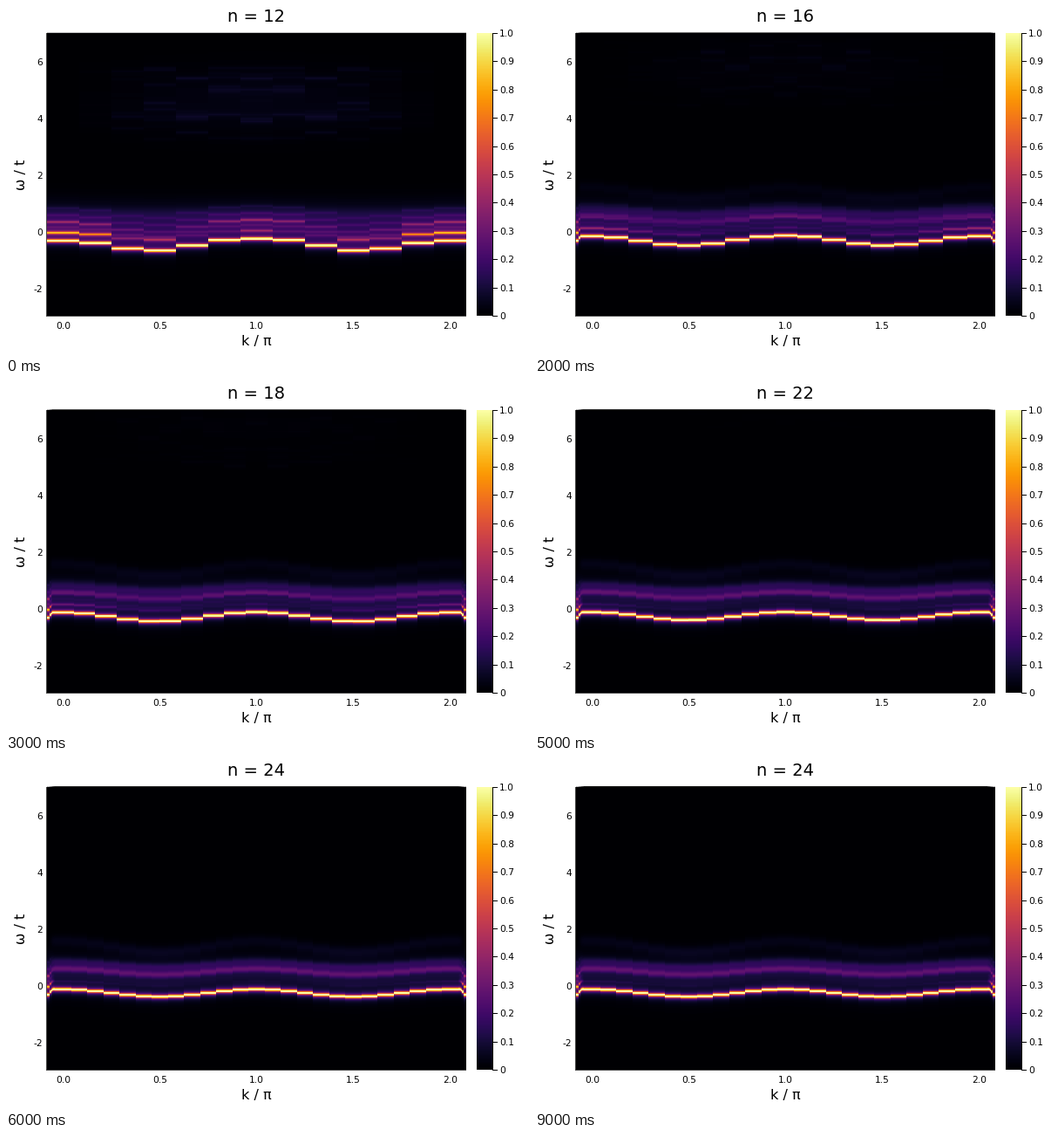
Recreate the animation shown at these times as a matplotlib script. Size 600 by 400 pixels, loop 10 s.

```python
import random

import numpy as np
import matplotlib.pyplot as plt
from matplotlib.animation import FuncAnimation

plt.rcParams["font.family"] = "DejaVu Sans"

W, H = 600, 400
LEFT, RIGHT, TOP, BOTTOM = 46, 528, 30, 356
UNIT_X, ZERO_X = 222.0, 65.5      # pixels per unit of k / pi, position of k = 0
UNIT_Y, ZERO_Y = 32.5, 259.0      # pixels per unit of omega / t, position of 0
FRAMES = 10
ETA = 0.045                       # line broadening
EDGE = 0.75                       # light left on the top row by each map
SPINE = 0.3
INFERNO = plt.get_cmap("inferno")

OMEGA = (ZERO_Y - np.arange(TOP + 1, BOTTOM - 1) - .5) / UNIT_Y
K = (np.arange(LEFT + 1, RIGHT) + .5 - ZERO_X) / UNIT_X


def sites(i):
    return min(24, 12 + 2 * i)


def sigmoid(x):
    return 1 / (1 + np.exp(-np.clip(x, -50, 50)))


def plateau(w, low, high, soft_low, soft_high):
    return sigmoid((w - low) / soft_low) * sigmoid((high - w) / soft_high)


def lorentz(w, center, height):
    return height * ETA**2 / ((w - center)**2 + ETA**2)


def gauss(w, center, width, height):
    return height * np.exp(-((w - center) / width)**2)


def lowest(k, step):
    """Lowest level: a cosine band whose finite-size shift dies out with n."""
    s = .55**step
    return (-.24 - .203 * s + (.192 - .01 * step) * np.cos(2 * np.pi * k)
            - s * (.06 * np.cos(np.pi * k) - .023 * np.cos(3 * np.pi * k)
                   + .02 * np.cos(4 * np.pi * k)))


def ladder(k, c, low):
    """Discrete levels above the lowest one, as (omega, height)."""
    first = np.interp(k, [0, .17, .33, .5, .67, .83, 1],
                      [.75, .62, .22, .34, .1, .1, .28])
    return [(low + .33 - .05 * c, first), (low + .66, .2 + .1 * c),
            (low + .48, .1), (low + .9, .08), (low + 1.15, .05)]


def spectrum(n, j, w):
    j = min(j, n - j)
    k = 2 * j / n
    step = (n - 12) / 2
    fade = .65**step
    c = np.cos(2 * np.pi * k)
    low = lowest(k, step)

    a = lorentz(w, low, 1.35)
    gap = .38 - .22 * fade
    a += (.04 + .04 * fade) * plateau(w, low + gap, .8, .05, .08)
    a += .04 * plateau(w, low + .1, 1.2, .08, .18)
    for center, height in ladder(k, c, low):
        a += lorentz(w, center, height * fade)

    # Continuum that replaces the ladder on large lattices
    grown = 1 - fade
    center = .45 + .01 * step + (.15 - .007 * step) * c
    a += gauss(w, center, .07 + .008 * step, .2 * grown)
    a += gauss(w, center + .25, .13, .1 * grown)
    a += gauss(w, 1.4 + .2 * c, .2, .04 * grown)

    # Faint high-energy levels
    rng = random.Random(100 * n + j)
    faint = fade * np.sin(np.pi * k / 2)
    middle = 4.6 + .6 * step
    a += gauss(w, middle, 1.2, .03 * faint)
    for _ in range(12):
        a += lorentz(w, middle + rng.uniform(-1.4, 1.4), rng.uniform(0, .04) * faint)
    return np.clip(a, 0, 1)


def paint(rgb, n):
    """Lay the map of an n-site lattice over what is already there."""
    column = np.floor(K * n / 2 + .5).astype(int)
    area = rgb[:, 1:]
    for j in range(n + 1):
        here = column == j
        area[1:-1, here] = INFERNO(spectrum(n, j, OMEGA))[:, None, :3]
        area[0, here] *= EDGE


def build_maps():
    rgb = np.ones((BOTTOM - TOP, RIGHT - LEFT, 3))
    rgb[-1] = SPINE
    rgb[1:, 0] = SPINE
    maps = []
    for i in range(FRAMES):
        paint(rgb, sites(i))
        maps.append(rgb.copy())
    return maps


MAPS = build_maps()

fig = plt.figure(figsize=(W / 72, H / 72), dpi=72, facecolor="white")
ax = fig.add_axes([0, 0, 1, 1])
ax.axis("off")


def label(x, y, s, size=10.67, ha="center", va="center_baseline", **kw):
    return ax.text(x, y, s, fontsize=size, ha=ha, va=va, **kw)


heat = ax.imshow(MAPS[0], extent=(LEFT, RIGHT, BOTTOM, TOP),
                 interpolation="nearest", aspect="auto")
ax.imshow(np.linspace(1, 0, 324)[:, None], cmap=INFERNO, vmin=0, vmax=1,
          extent=(540, 558, 355, 31), interpolation="nearest", aspect="auto")
ax.set(xlim=(0, W), ylim=(H, 0))

for v in np.arange(0, 2.5, .5):
    label(ZERO_X + v * UNIT_X, 365.5, f"{v:.1f}")
for v in range(-2, 7, 2):
    label(42, ZERO_Y - v * UNIT_Y, str(v), ha="right")

ax.plot([558, 558], [31, 355], color="black", lw=1)
for i in range(11):
    y = 355 - 32.4 * i
    ax.plot([558, 563], [y, y], color="black", lw=1)
    label(566, y, f"{i / 10:.1f}" if i else "0", ha="left")

label(287.5, 383.5, "k / π", 16)
label(22, 193, "ω / t", 16, va="baseline", rotation=90, rotation_mode="anchor")
title = label(287.5, 10, "n = 12", 19.5)


def update(i):
    heat.set_data(MAPS[i])
    title.set_text(f"n = {sites(i)}")
    return heat, title


anim = FuncAnimation(fig, update, frames=FRAMES, interval=1000,
                     repeat=True, repeat_delay=0, blit=False)
plt.show()
```
